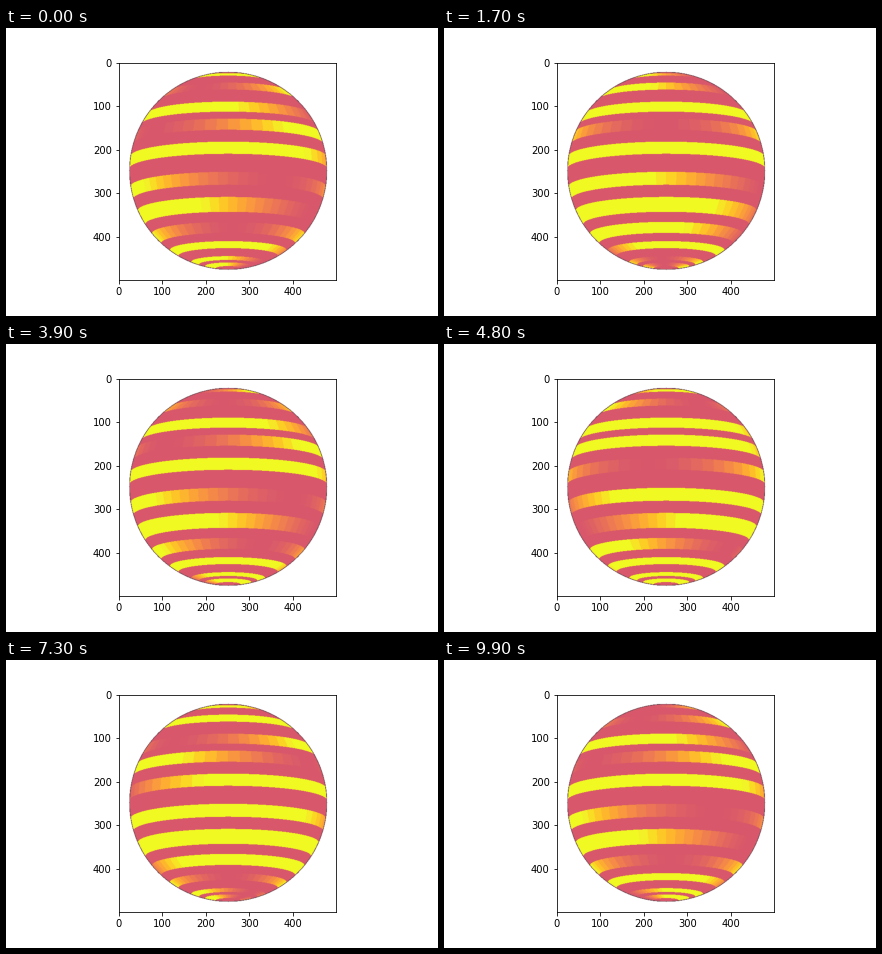
A matplotlib script that plays this animation: 432x288 px, repeating every 10000 ms.

```python
import numpy as np
import matplotlib.pyplot as plt
from matplotlib.animation import FuncAnimation

FRAMES = 100
SIZE = 500
CX, CY, R = 250, 249, 227
TILT = np.radians(8.6)
BASE = 5 / 9  # plasma level of the plain sphere

# upper latitude, lower latitude, cells around, turns per loop, start angle
BANDS = [
    (72.0, 65.5, 50, 1.5, 155),
    (54.4, 46.5, 50, 10, -25),
    (35.7, 28.1, 50, 10, 95),
    (23.2, 15.9, 50, 5, -53),
    (8.5, 1.3, 50, 5, 142),
    (-9.2, -16.7, 60, 5, 30),
    (-23.9, -33.1, 60, 5, 72),
    (-39.7, -47.5, 50, 10, 4),
    (-53.9, -60.0, 50, 10, 136),
    (-68.2, -72.9, 50, 1.5, 85),
    (-76.5, -83.0, 50, 1.5, 85),
]

plasma = plt.get_cmap("plasma")


def rgb(level):
    return (plasma(level)[..., :3] * 255).round().astype(np.uint8)


def sphere_cells():
    """Index of the colour cell under every pixel, plus the centre of each cell."""
    py, px = np.mgrid[:SIZE, :SIZE]
    x, y = (px - CX) / R, (CY - py) / R
    r = np.hypot(x, y)
    z = np.sqrt(np.clip(1 - r**2, 0, None))
    up = y * np.cos(TILT) - z * np.sin(TILT)
    depth = z * np.cos(TILT) + y * np.sin(TILT)
    lat = np.degrees(np.arcsin(np.clip(up, -1, 1)))
    lon = np.degrees(np.arctan2(x, depth)) % 360

    index = np.ones((SIZE, SIZE), int)
    centres, turns, starts = [], [], []
    offset = 3
    for top, bottom, n, turn, start in BANDS:
        inside = (lat < top) & (lat > bottom)
        cell = (lon * n / 360).astype(int) % n
        index[inside] = offset + cell[inside]
        centres.append((np.arange(n) + 0.5) * 360 / n)
        turns.append(np.full(n, turn))
        starts.append(np.full(n, start))
        offset += n
    index[r > 1 - 1.6 / R] = 2
    index[r > 1] = 0
    return index, *(np.concatenate(a) for a in (centres, turns, starts))


index, centres, turns, starts = sphere_cells()
fixed = np.array([[255, 255, 255], rgb(np.array(plasma(BASE))[None] * 0 + BASE)[0, 0],
                  [110, 70, 80]], np.uint8)


def picture(frame):
    trough = starts - 360 * turns * frame / (FRAMES - 1)
    dip = np.clip(np.cos(np.radians(centres - trough)), 0, 1)
    colours = rgb(plasma_level(dip))
    return np.vstack([fixed, colours])[index]


def plasma_level(dip):
    return 1 - (1 - BASE) * dip


plt.rcParams.update({"font.family": "DejaVu Sans", "font.size": 10})
fig, ax = plt.subplots(figsize=(6, 4), dpi=72)
fig.subplots_adjust(left=0.125, right=0.9, bottom=0.125, top=0.88)
image = ax.imshow(picture(0))


def update(frame):
    image.set_data(picture(frame))
    return (image,)


anim = FuncAnimation(fig, update, frames=FRAMES, interval=100,
                     repeat=True, repeat_delay=0, blit=False)
plt.show()
```
